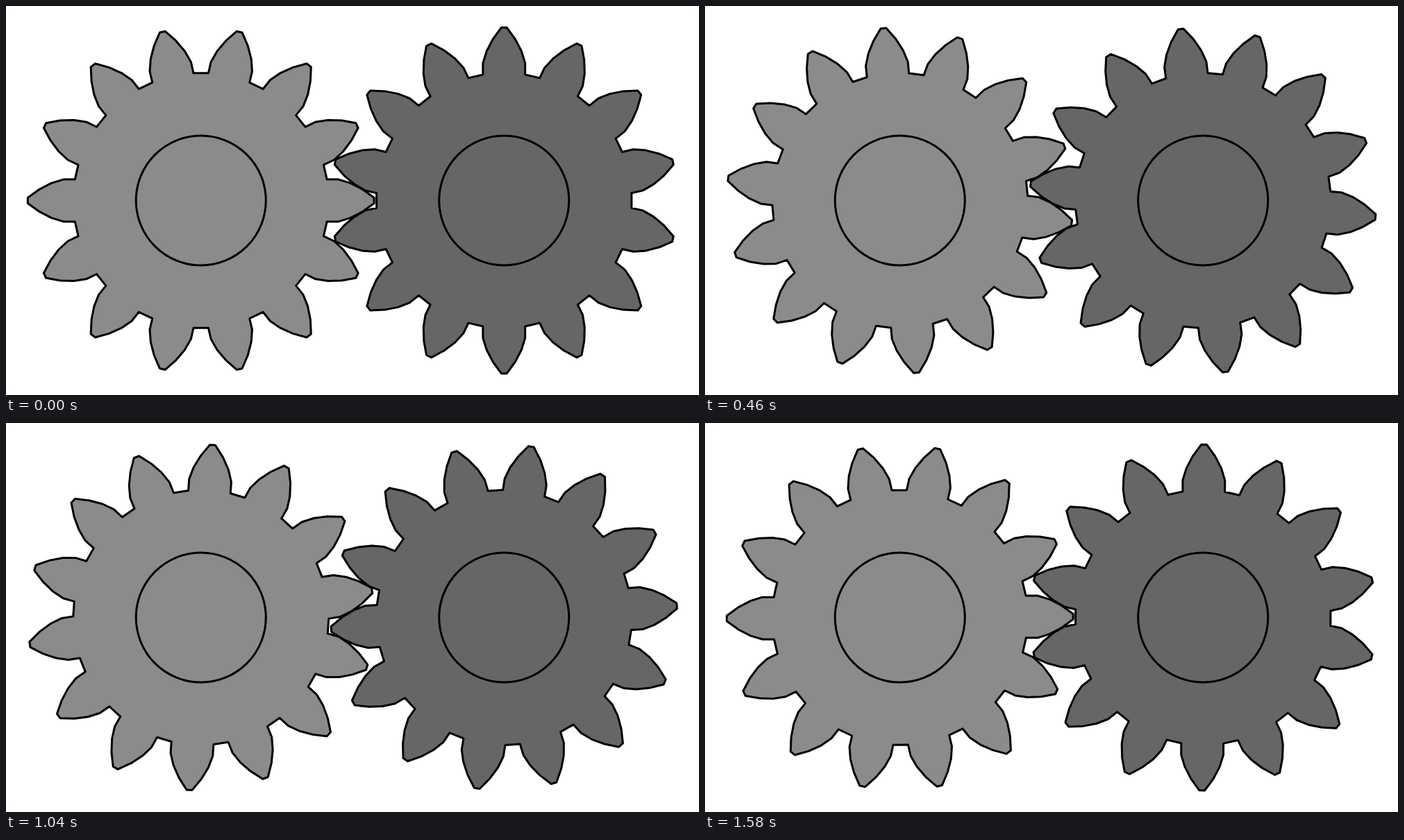
Recreate the animation shown at these times as an HTML page. Size 998 by 561 pixels, loop 1600 ms.

```html
<!DOCTYPE html>
<html lang="en">
<head>
<meta charset="utf-8">
<title>Meshing gears</title>
<style>
  html, body { margin: 0; width: 100%; height: 100%; overflow: hidden; background: #fff; }
  svg { display: block; width: 100vw; height: 100vh; }
  .gear { stroke: #000; stroke-width: 3; stroke-linejoin: round; }
</style>
</head>
<body>
<svg viewBox="0 0 998 561">
  <g class="gear" id="left" fill="#8b8b8b"><path/><circle/></g>
  <g class="gear" id="right" fill="#666"><path/><circle/></g>
</svg>
<script>
const LOOP = 1600, STEP = 20;
const TEETH = 14, PITCH = 218.25, CX = 499, CY = 280.5;
const MODULE = 2 * PITCH / TEETH;
const TIP = PITCH + MODULE, ROOT = PITCH - 1.1 * MODULE;
const BASE = PITCH * Math.cos(Math.PI / 6);
const HUB = 3 * MODULE, FLANK_STEPS = 4;

// Involute angle at radius r; zero below the base circle.
function involute(r) {
  if (r <= BASE) return 0;
  const a = Math.acos(BASE / r);
  return Math.tan(a) - a;
}

// Half the angle a tooth covers at radius r.
function halfWidth(r) {
  return Math.PI / (2 * TEETH) + involute(PITCH) - involute(r);
}

function gearPath() {
  const radii = Array.from({ length: FLANK_STEPS + 1 },
    (_, i) => ROOT + (TIP - ROOT) * i / FLANK_STEPS);
  const points = [];
  const add = (r, a) =>
    points.push((r * Math.cos(a)).toFixed(3) + ' ' + (r * Math.sin(a)).toFixed(3));
  for (let k = 0; k < TEETH; k++) {
    const mid = 2 * Math.PI * k / TEETH;
    for (const r of radii) add(r, mid - halfWidth(r));
    for (const r of [...radii].reverse()) add(r, mid + halfWidth(r));
  }
  return 'M' + points.join('L') + 'Z';
}

function makeGear(id, x, phase, dir) {
  const group = document.getElementById(id);
  const body = group.querySelector('path');
  body.setAttribute('d', gearPath());
  group.querySelector('circle').setAttribute('r', HUB);
  group.setAttribute('transform', `translate(${x} ${CY})`);
  return turn => body.setAttribute('transform', `rotate(${phase + dir * turn})`);
}

const pitchAngle = 360 / TEETH;
const gears = [
  makeGear('left', CX - PITCH, 0, 1),
  makeGear('right', CX + PITCH, pitchAngle / 2, -1)
];

function draw(ms) {
  const t = Math.floor(ms / STEP) * STEP % LOOP;
  gears.forEach(rotate => rotate(pitchAngle * t / LOOP));
}

const start = performance.now();
function tick(now) {
  draw(Math.max(0, now - start));
  requestAnimationFrame(tick);
}
draw(0);
requestAnimationFrame(tick);
</script>
</body>
</html>
```
